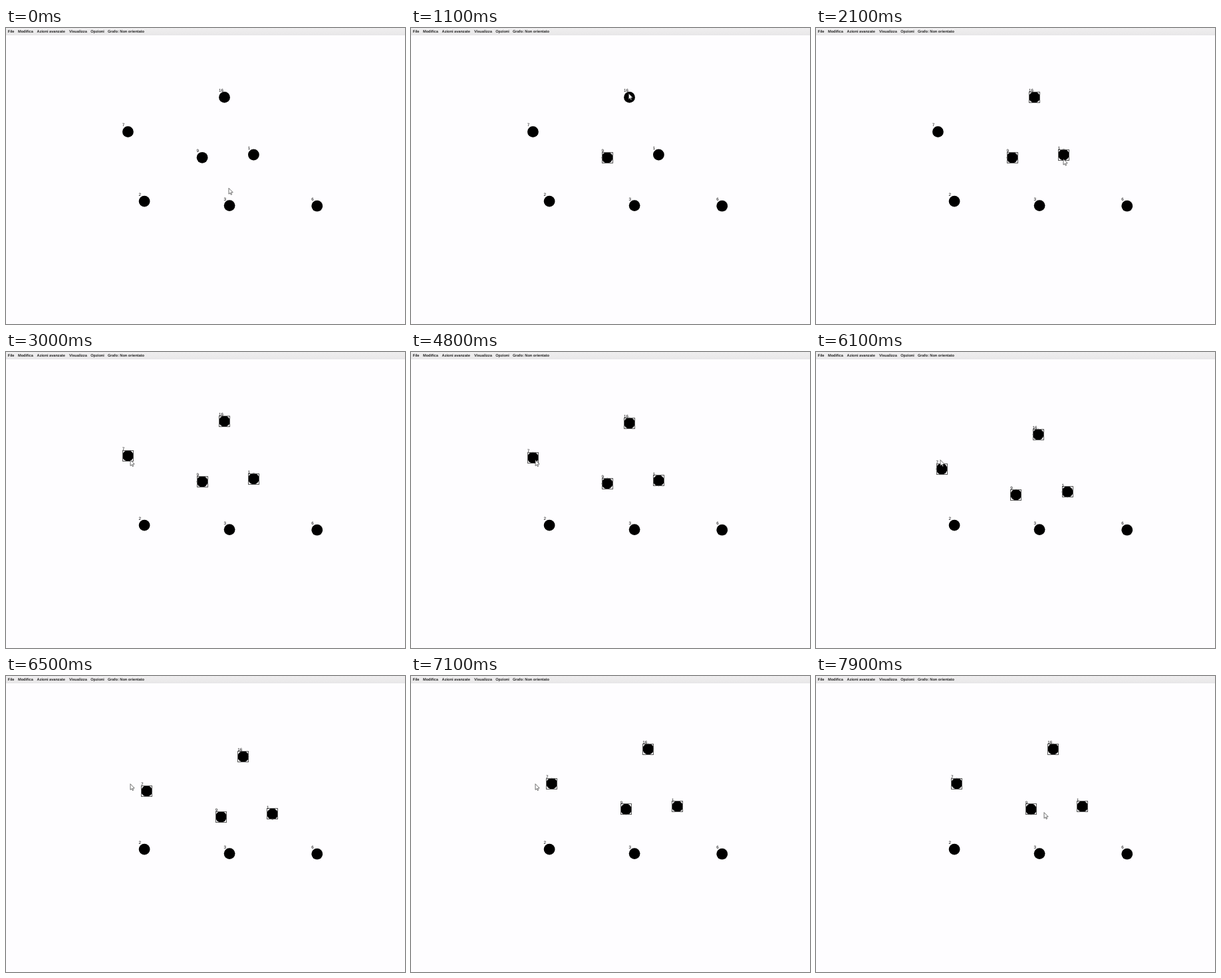
Write an HTML page with a canvas that moves like this. It is 600 px wide and 446 px high and loops after 8 s.

```html
<!DOCTYPE html>
<html lang="it">
<head>
<meta charset="utf-8">
<title>Editor di grafi</title>
<style>
html, body { margin: 0; width: 100%; height: 100%; overflow: hidden; background: #fefdff; }
canvas { display: block; width: 600px; height: 446px; }
</style>
</head>
<body>
<canvas id="stage"></canvas>
<script>
const W = 600, H = 446, LOOP = 8000, TICK = 100;
const KEY_STEP = 2.83;   // distance of one arrow-key press
const KEY_DELAY = 500;   // held key: wait before repeating
const KEY_REPEAT = 33;   // held key: time between repeats
const R = 8.4;
const FONT = '"Liberation Sans", Arial, sans-serif';

const canvas = document.getElementById('stage');
const ctx = canvas.getContext('2d');
const dpr = window.devicePixelRatio || 1;
canvas.width = W * dpr;
canvas.height = H * dpr;

// pick: time at which the node becomes selected
const nodes = [
  { label: '16', x: 328.5, y: 104.4, pick: 1200 },
  { label: '7', x: 183.4, y: 156.4, pick: 3000 },
  { label: '9', x: 295.1, y: 195.3, pick: 500 },
  { label: '1', x: 372.4, y: 191, pick: 2100 },
  { label: '2', x: 208.1, y: 261.1 },
  { label: '3', x: 336.1, y: 267.6 },
  { label: '6', x: 467.8, y: 268.2 }
];

const menu = {
  'File': 2.8, 'Modifica': 18, 'Azioni avanzate': 46.6,
  'Visualizza': 95, 'Opzioni': 127.2, 'Grafo: Non orientato': 152.9
};

// arrow keys held down, one after the other
const keys = [
  { start: 4800, dx: 0, dy: 1, presses: 7 },
  { start: 5600, dx: 1, dy: 0, presses: 10 },
  { start: 6500, dx: 0, dy: -1, presses: 5 }
];

// pointer strokes, each starting where the last one ended
const home = { x: 335, y: 241 };
const strokes = [
  { from: 0, to: 450, x: 294, y: 195 },
  { from: 500, to: 950, x: 327.3, y: 98.3 },
  { from: 1400, to: 1900, x: 372, y: 197 },
  { from: 2100, to: 2800, x: 187, y: 162.3 },
  { from: 7300, to: 7500, x: 138, y: 192 },
  { from: 7500, to: 7800, x: 380, y: 212 },
  { from: 7800, to: 7900, x: 343, y: 205.3 }
];

const clamp01 = v => Math.min(1, Math.max(0, v));
const ease = p => p * p * (3 - 2 * p);

function pressesAt(key, t) {
  const held = t - key.start;
  if (held < 0) return 0;
  if (held < KEY_DELAY) return 1;
  return Math.min(key.presses, 2 + Math.floor((held - KEY_DELAY) / KEY_REPEAT));
}

function shiftAt(t) {
  const shift = { x: 0, y: 0 };
  for (const key of keys) {
    const dist = pressesAt(key, t) * KEY_STEP;
    shift.x += key.dx * dist;
    shift.y += key.dy * dist;
  }
  return shift;
}

function pointerAt(t) {
  let { x, y } = home;
  for (const s of strokes) {
    const p = ease(clamp01((t - s.from) / (s.to - s.from)));
    x += (s.x - x) * p;
    y += (s.y - y) * p;
  }
  return { x, y };
}

function drawMenu() {
  const fill = ctx.createLinearGradient(0, 0, 0, 10);
  fill.addColorStop(0, '#efeeef');
  fill.addColorStop(1, '#e9e8e9');
  ctx.fillStyle = fill;
  ctx.fillRect(0, 0, W, 10);
  ctx.fillStyle = '#dedddf';
  ctx.fillRect(0, 10, W, 0.7);
  ctx.fillStyle = '#222';
  ctx.font = `bold 5.63px ${FONT}`;
  for (const text in menu) ctx.fillText(text, menu[text], 7);
}

function drawNode(node, t, shift) {
  const selected = t >= node.pick;
  const x = node.x + (selected ? shift.x : 0);
  const y = node.y + (selected ? shift.y : 0);
  ctx.fillStyle = '#000';
  ctx.beginPath();
  ctx.arc(x, y, R, 0, Math.PI * 2);
  ctx.fill();
  if (selected) {
    // whole pixels keep the frame crisp
    ctx.strokeStyle = '#555';
    ctx.lineWidth = 1;
    ctx.strokeRect(Math.floor(x - 8) + 0.5, Math.floor(y - 8) + 0.5, 16, 16);
  }
  ctx.font = `6.3px ${FONT}`;
  ctx.fillText(node.label, x - R - 0.2, y - R + 0.3);
}

function drawPointer({ x, y }) {
  ctx.save();
  ctx.translate(x, y + 0.3);
  ctx.fillStyle = '#fff';
  ctx.strokeStyle = '#222';
  ctx.lineWidth = 0.65;
  const arrow = new Path2D('M0 0V8.9L2 7.1L3.3 10L4.6 9.4L3.4 6.6L6.2 6.4Z');
  ctx.fill(arrow);
  ctx.stroke(arrow);
  ctx.restore();
}

function render(now) {
  const t = Math.floor((now % LOOP) / TICK) * TICK;
  const shift = shiftAt(t);
  ctx.setTransform(dpr, 0, 0, dpr, 0, 0);
  ctx.textRendering = 'geometricPrecision';
  ctx.fillStyle = '#fefdff';
  ctx.fillRect(0, 0, W, H);
  drawMenu();
  for (const node of nodes) drawNode(node, t, shift);
  drawPointer(pointerAt(t));
}

const start = performance.now();
function loop() {
  render(performance.now() - start);
  requestAnimationFrame(loop);
}
loop();
</script>
</body>
</html>
```
